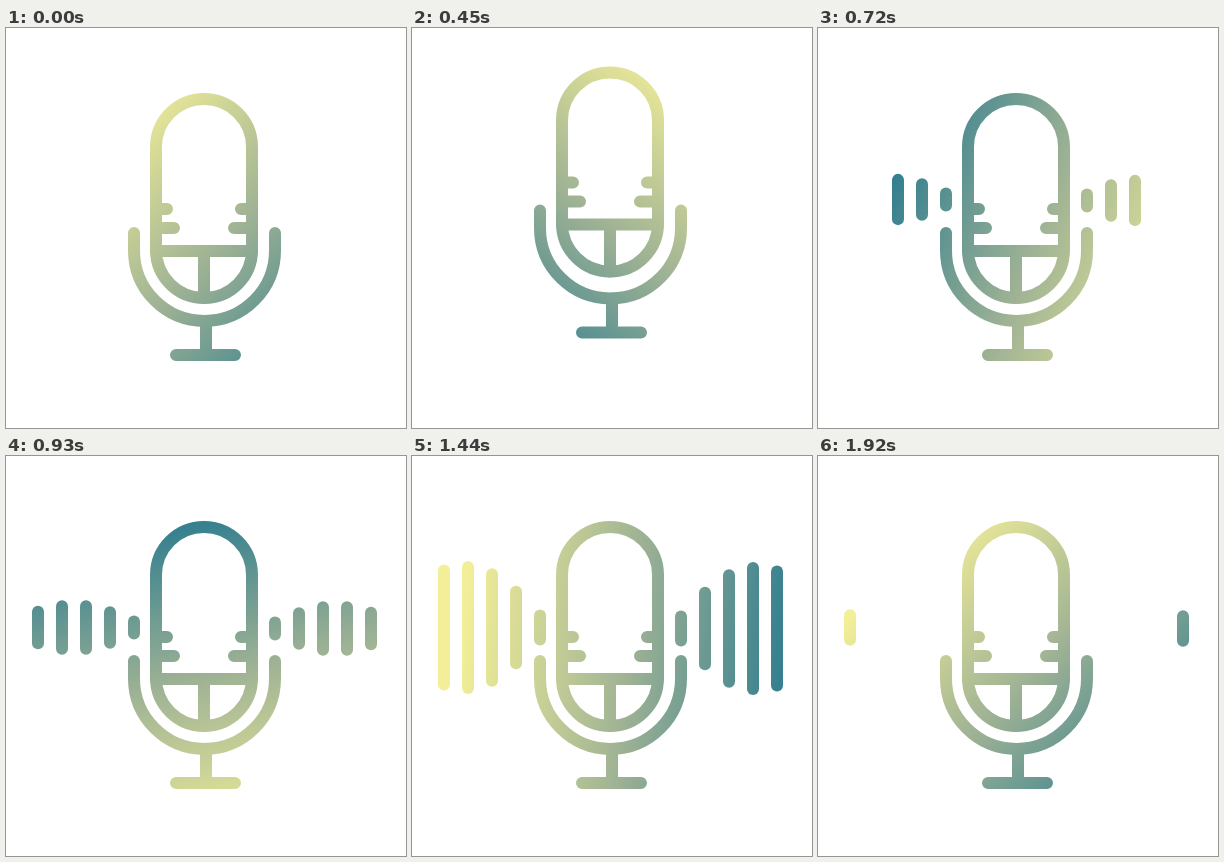
Recreate the animation shown at these times as an HTML page. Size 400x400 px, loop 3950 ms.

```html
<!DOCTYPE html>
<html lang="en">
<head>
<meta charset="utf-8">
<title>Microphone</title>
<style>
  html, body { margin: 0; width: 100%; height: 100%; overflow: hidden; background: #fff; }
  svg { display: block; width: 100%; height: 100%; }
</style>
</head>
<body>
<svg viewBox="0 0 400 400">
  <defs>
    <linearGradient id="tint" gradientUnits="userSpaceOnUse" x1="46" x2="386" y1="218" y2="218">
      <stop offset="0" stop-color="#f3ef98"/>
      <stop offset=".5" stop-color="#9eb294"/>
      <stop offset="1" stop-color="#2a7a8f"/>
    </linearGradient>
    <mask id="shape" maskUnits="userSpaceOnUse" x="0" y="0" width="400" height="400">
      <g fill="none" stroke="#fff" stroke-width="12" stroke-linecap="round">
        <g id="body">
          <rect x="150" y="71" width="96" height="199" rx="48"/>
          <path d="M150 223H246M198 223V270"/>
          <path d="M150 181H161M150 200H168M246 181H235M246 200H228"/>
        </g>
        <g id="stand">
          <path d="M128 205V222.5A70.5 70.5 0 0 0 269 222.5V205"/>
          <path d="M200 293V327M170 327H229"/>
        </g>
      </g>
      <g id="bars" fill="#fff"></g>
    </mask>
  </defs>
  <rect width="400" height="400" fill="url(#tint)" mask="url(#shape)"/>
</svg>
<script>
const LOOP = 3950, STEP = 30, LAST = 1920, BARS = 5;
const [tint, body, stand, barLayer] =
  ['tint', 'body', 'stand', 'bars'].map(id => document.getElementById(id));

const mix = (a, b, p) => a + (b - a) * p;
const smooth = p => p * p * (3 - 2 * p);
const ramp = (t, start, length) => smooth(Math.min(1, Math.max(0, (t - start) / length)));

function setAll(node, attrs) {
  for (const name in attrs) node.setAttribute(name, attrs[name]);
}

function addBar(x) {
  const bar = document.createElementNS('http://www.w3.org/2000/svg', 'rect');
  setAll(bar, { x: x - 6, width: 12, rx: 6 });
  return barLayer.appendChild(bar);
}

const bars = Array.from({ length: BARS }, (_, i) => ({
  left: addBar(128 - 24 * i), right: addBar(269 + 24 * i)
}));

// Half height of bar i, counted from the microphone outward:
// a low ripple, then a bulge, then a fan, with staggered entry and exit
function barReach(i, t) {
  const bulge = Math.sin(0.62 * i);
  const ripple = 12 + 16 * bulge, swell = 16 + 57 * bulge, fan = 20 + 14 * i;
  const level = mix(mix(ripple, swell, ramp(t, 930, 300)), fan, ramp(t, 1230, 430));
  return level * ramp(t, 540 + 60 * i, 70) * (1 - ramp(t, 1655 + 45 * i, 125));
}

function draw(t) {
  const lift = -33 * (ramp(t, 0, 390) - ramp(t, 390, 210));
  body.setAttribute('transform', `translate(0 ${lift})`);
  stand.setAttribute('transform', `translate(0 ${lift * 0.85})`);

  const turn = 45 + 360 * smooth(Math.pow(t / LAST, 0.8));
  tint.setAttribute('gradientTransform', `rotate(${turn} 216 218)`);

  bars.forEach(({ left, right }, i) => {
    const h = barReach(i, t);
    setAll(left, { y: 171.5 - h, height: 2 * h });
    setAll(right, { y: 172.5 - h, height: 2 * h });
  });
}

const start = performance.now();
function tick() {
  const t = (performance.now() - start) % LOOP;
  draw(Math.min(Math.floor(t / STEP) * STEP, LAST));
  requestAnimationFrame(tick);
}
tick();
</script>
</body>
</html>
```
